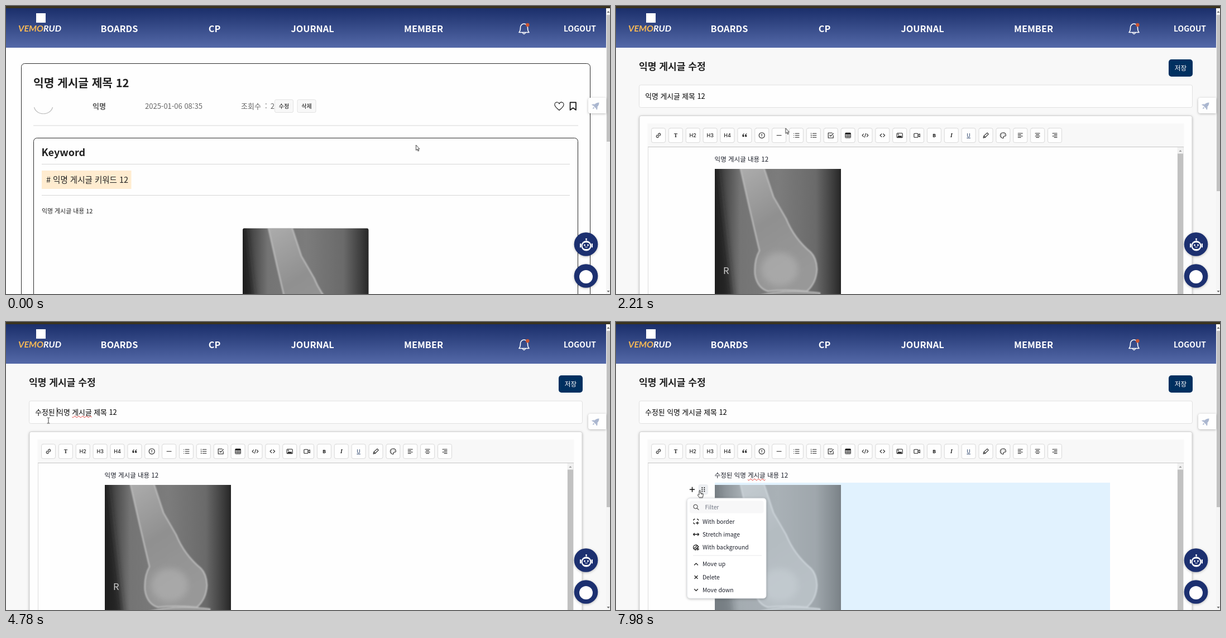
Write an HTML page that moves like this. It is 1082x518 px and loops after 8 s.

```html
<!DOCTYPE html>
<html lang="ko">
<head>
<meta charset="utf-8">
<title>익명 게시글 수정</title>
<style>
html, body { margin: 0; width: 100%; height: 100%; overflow: hidden; background: #fefefe; }
body, text { font-family: "Noto Sans CJK KR", "Noto Sans KR", "Noto Sans CJK JP", "Noto Sans", sans-serif; }
svg { position: absolute; left: 0; top: 0; width: 1082px; height: 518px; overflow: hidden; }
.b { font-weight: 700; }
.m { font-weight: 500; }
.c { text-anchor: middle; }
.line { position: absolute; line-height: 20px; white-space: pre; color: #000; }
#title { left: 52.3px; top: 151.6px; font-size: 12.8px; }
#content { left: 176.6px; top: 264.5px; font-size: 11.5px; color: #1d202b; }
.typed::before, .typed::after { content: ""; }
.typed::after { text-decoration: underline 1px; text-underline-offset: 3px; }
.caret { display: inline-block; width: 1px; height: 1.3em; margin-right: -1px; background: #000; vertical-align: -.28em; }
.spell { text-decoration: underline wavy 1px transparent; text-underline-offset: 1px; text-decoration-skip-ink: none; }
.lift { filter: drop-shadow(0 1px 2px #0004); }
.ico { fill: none; stroke: #222; stroke-width: 1.1; stroke-linecap: round; stroke-linejoin: round; }
.ico .f { fill: #222; stroke: none; }
</style>
</head>
<body>
<svg viewBox="0 0 1082 518">
  <defs>
    <linearGradient id="navy" x2="0" y2="1">
      <stop stop-color="#1b2f6b"/><stop offset="1" stop-color="#5469a8"/>
    </linearGradient>
    <linearGradient id="film">
      <stop stop-color="#2a2a2a"/><stop offset=".07" stop-color="#454545"/>
      <stop offset=".2" stop-color="#747474"/><stop offset=".5" stop-color="#7c7c7c"/>
      <stop offset=".8" stop-color="#6a6a6a"/><stop offset=".94" stop-color="#3c3c3c"/>
      <stop offset="1" stop-color="#262626"/>
    </linearGradient>
    <linearGradient id="bone" x2=".4" y2="1">
      <stop stop-color="#adadad"/><stop offset=".5" stop-color="#909090"/><stop offset="1" stop-color="#989898"/>
    </linearGradient>
    <filter id="soft"><feGaussianBlur stdDeviation="1.3"/></filter>
    <filter id="softer" x="-1" y="-1" width="3" height="3"><feGaussianBlur stdDeviation="6"/></filter>
    <clipPath id="edge"><rect width="226" height="240"/></clipPath>
    <clipPath id="round"><rect x="424" y="399.5" width="225.5" height="140" rx="4"/></clipPath>
    <g id="photo" clip-path="url(#edge)">
      <rect width="226" height="240" fill="url(#film)"/>
      <path d="M-20 -20H2L34 250H-20Z" fill="#1c1c1c" opacity=".8" filter="url(#softer)"/>
      <g filter="url(#soft)">
        <path d="M70 230Q120 215 188 223V250H70Z" fill="#989898" stroke="#bbb" stroke-width="2"/>
        <path d="M45 -5L62 70 80 147Q70 165 72 190 76 214 95 220 125 216 165 220 182 205 183 180 182 160 172 150 142 125 128 90L105 50 87 -5Z" fill="url(#bone)" stroke="#b9b9b9" stroke-width="2.5"/>
      </g>
      <ellipse cx="116" cy="180" rx="33" ry="30" fill="#b4b4b4" opacity=".6" filter="url(#softer)"/>
      <text x="15" y="189" font-size="16.5" fill="#cfcfcf">R</text>
    </g>
  </defs>

  <g id="post">
    <rect width="1082" height="518" fill="#fefefe"/>
    <g fill="none" stroke="#2b2b2b">
      <rect x="27.5" y="103.5" width="1019" height="440" rx="6"/>
      <rect x="49.5" y="237.5" width="975" height="300" rx="6"/>
    </g>
    <path d="M49 215H1025M64 284.5H1010M64 340.5H1010" stroke="#d6d6d6"/>
    <path d="M50.5 182A16.8 14.5 0 0 0 83.5 182" fill="none" stroke="#bdbdbd" stroke-width="1.2"/>
    <text class="b" x="49" y="145.8" font-size="20.3" fill="#212121">익명 게시글 제목 12</text>
    <g font-size="13" fill="#666">
      <text class="b" x="155" y="184.8" fill="#555">익명</text>
      <text x="249" y="184.8">2025-01-06 08:35</text>
      <text x="421" y="184.8">조회수</text><text x="464" y="184.8">:</text><text x="473.7" y="184.8">2</text>
    </g>
    <g fill="#f8f8f8" stroke="#e2e2e2">
      <rect x="481.5" y="168.5" width="33" height="23" rx="2.5"/>
      <rect x="522" y="168.5" width="33" height="23" rx="2.5"/>
      <rect id="hover" x="481.5" y="168.5" width="33" height="23" rx="2.5" fill="#dfdfdf" stroke="#dadada"/>
    </g>
    <g class="c" font-size="10">
      <text x="498" y="183.7">수정</text><text x="538.5" y="183.7">삭제</text>
    </g>
    <path d="M991 187.5C986 183.5 983 181 983 177.8A4 4 0 0 1 991 176.3 4 4 0 0 1 999 177.8C999 181 996 183.5 991 187.5Z" fill="none" stroke="#222" stroke-width="1.2"/>
    <path d="M1010.6 173.3H1021V187L1015.8 183.3 1010.6 187Z" fill="none" stroke="#111" stroke-width="1.7" stroke-linejoin="round"/>
    <text class="b" x="63.5" y="269.7" font-size="18" fill="#212121">Keyword</text>
    <rect x="64" y="296" width="160.5" height="33" fill="#ffecd0"/>
    <text x="72" y="317.9" font-size="14.5" fill="#222">#&#160;익명 게시글 키워드 12</text>
    <text x="64" y="373" font-size="10.9" fill="#222">익명 게시글 내용 12</text>
    <g clip-path="url(#round)"><use href="#photo" x="424" y="399.5"/></g>
  </g>

  <g id="edit">
    <rect width="1082" height="518" fill="#f8f8f8"/>
    <text class="b" x="41" y="115" font-size="17.1" fill="#212121">익명 게시글 수정</text>
    <rect x="990" y="96" width="43" height="31" rx="5" fill="#003060"/>
    <text class="c" x="1011.5" y="116.3" font-size="11.6" fill="#fff">저장</text>
    <rect x="41.5" y="142" width="991" height="40.5" rx="3" fill="#fefefe" stroke="#e0e0e0"/>
    <text id="hint" x="52.3" y="166.9" font-size="12.8" fill="#757575">제목을 입력하세요.</text>
    <rect class="lift" x="42" y="197.5" width="990" height="340" rx="3" fill="#fefefe" stroke="#d4d4d4"/>
    <rect x="56.5" y="211.5" width="961" height="42" fill="#f8f8f8"/>
    <path d="M57.5 518V253.5H1016.5V518" fill="none" stroke="#dcdcdc"/>
    <path d="M57 253.5H1017" stroke="#c4c4c4"/>
    <g id="bar"></g>
    <g id="body">
      <rect id="picked" x="177" y="289" width="708" height="230" fill="#e1f2fe"/>
      <use id="scan" href="#photo" x="177" y="293"/>
      <rect x="1005.5" y="254" width="11" height="264" fill="#f1f1f1"/>
      <rect x="1006" y="265.5" width="10" height="253" fill="#c1c1c1"/>
      <path d="M1008.5 262L1011 259 1013.5 262Z" fill="#999"/>
    </g>
  </g>

  <rect width="1075" height="71" y="4" fill="url(#navy)"/>
  <rect width="1082" height="4" fill="#3a3420"/>
  <rect x="54" y="13" width="17" height="17" fill="#fff"/>
  <text class="c" x="60.5" y="46" style="font:italic 700 16px Lato,sans-serif" fill="#f7b955">VEMO<tspan fill="#fff">RUD</tspan></text>
  <g class="b c" font-size="16.3" fill="#fff">
    <text x="203" y="46.5">BOARDS</text><text x="373.5" y="46.5">CP</text>
    <text x="549" y="46.5">JOURNAL</text><text x="748" y="46.5">MEMBER</text>
    <text x="1028" y="45.7" font-size="13.9">LOGOUT</text>
  </g>
  <path d="M919 47.5Q921.5 45 921.5 39A6.5 7 0 0 1 934.5 39Q934.5 45 937 47.5ZM925.5 48Q928 53 930.5 48" fill="none" stroke="#fff" stroke-width="1.6" stroke-linejoin="round"/>
  <circle cx="934.3" cy="34" r="3.2" fill="#cf5530"/>

  <rect x="1075" y="4" width="7" height="514" fill="#f5f5f5"/>
  <rect x="1076" y="16" width="6" height="228" fill="#c1c1c1"/>
  <rect id="thumb" x="1076" y="16" width="6" height="317" fill="#c1c1c1"/>
  <path d="M1076.5 12L1079 9 1081.5 12ZM1076.5 512L1079 515 1081.5 512Z" fill="#666"/>

  <path class="lift" d="M1075 165H1047Q1043 165 1043 169V189Q1043 193 1047 193H1075Z" fill="#fefefe"/>
  <path transform="translate(1056.5 179.5) rotate(45)" d="M0-8.5Q4.5-4 3 3H-3Q-4.5-4 0-8.5ZM-4-1L-7 4-3 3ZM4-1L7 4 3 3ZM-1.5 4.5H1.5L0 8Z" fill="#aab6cf"/>

  <g class="lift" fill="#1c3070">
    <circle cx="1039" cy="428.5" r="21.3"/><circle cx="1039" cy="485.5" r="21.3"/>
  </g>
  <g fill="#fff">
    <circle cx="1039" cy="487" r="12"/>
    <circle cx="1039.5" cy="419.3" r="1.5"/>
    <path d="M1039 419H1040V424H1039Z"/>
    <rect x="1028" y="427" width="2.3" height="7.5" rx="1.1"/><rect x="1048.7" y="427" width="2.3" height="7.5" rx="1.1"/>
    <ellipse cx="1039.5" cy="431.3" rx="9" ry="9.3"/>
  </g>
  <rect x="1032.7" y="425.5" width="13.6" height="11.5" rx="5.5" fill="#1c3070"/>
  <path d="M1037 432.8Q1039.5 435.5 1042 432.8" fill="none" stroke="#fff"/>
  <circle cx="1036.5" cy="430" r="1.5" fill="#fff"/><circle cx="1042.5" cy="430" r="1.5" fill="#fff"/>
</svg>

<div class="line" id="title"><span class="typed" id="word1"></span><span class="caret" id="caret1"></span>익명 <span class="spell" id="spell1">게시글</span> 제목 12</div>
<div class="line" id="content"><span class="typed" id="word2"></span><span class="caret" id="caret2"></span>익명 <span class="spell" id="spell2">게시글</span> 내용 12</div>

<svg viewBox="0 0 1082 518">
  <g id="tools">
    <rect id="grip" x="147.5" y="265" width="17.5" height="18.5" rx="4" fill="#eceef1"/>
    <path d="M132.5 274.3H140.5M136.5 270.3V278.3" stroke="#111" stroke-width="1.5" stroke-linecap="round"/>
    <path d="M154.3 271V278M158.3 271V278" stroke="#111" stroke-width="2" stroke-linecap="round" stroke-dasharray="0 3.3"/>
  </g>

  <g id="menu">
    <rect class="lift" x="127.5" y="317" width="141.5" height="180" rx="5" fill="#fff" stroke="#e6e8ec"/>
    <rect x="132" y="321.5" width="132.5" height="22.5" rx="4" fill="#f7f7f8"/>
    <path d="M138 420H261" stroke="#e8e8eb"/>
    <g class="ico" style="stroke-width:1.3">
      <path stroke="#666" d="M145.3 334.3A3.6 3.6 0 1 0 144.8 334.8L148 337.5"/>
      <path d="M141 354.5Q139 354.5 139 356.5M139 361Q139 363 141 363M145.5 354.5Q147.5 354.5 147.5 356.5M143.5 361.5H148M145.8 359.3V363.7"/>
      <path d="M138.5 382H148.5M140.5 380L138.5 382 140.5 384M146.5 380L148.5 382 146.5 384"/>
      <path d="M147.5 405A4.5 4.5 0 1 0 143.5 410M139.5 407.5L146 402M141 409.5L148 404M144.5 408.5H148.5M146.5 406.5V410.5"/>
      <path d="M140.5 437L143.5 434 146.5 437M141 456.5L146 461.5M146 456.5L141 461.5M140.5 480.5L143.5 483.5 146.5 480.5"/>
    </g>
    <g class="m" font-size="10.3" fill="#1d202b">
      <text x="159.5" y="336.5" fill="#707684" font-weight="400">Filter</text>
      <text x="155" y="362.8">With border</text>
      <text x="155" y="385.9">Stretch image</text>
      <text x="155" y="409.2">With background</text>
      <text x="155" y="439.3">Move up</text>
      <text x="155" y="462.6">Delete</text>
      <text x="155" y="485.8">Move down</text>
    </g>
  </g>

  <g id="dialog">
    <rect class="lift" x="383" y="-10" width="319" height="110" rx="7" fill="#1e1c15" stroke="#4a473d"/>
    <text x="398.5" y="23.1" font-size="11.2" fill="#e8e4d8">vemorud.info 내용:</text>
    <text x="398.5" y="43.7" font-size="10.1" fill="#e0dccf">수정 페이지로 이동하시겠습니까?</text>
    <rect id="ring" x="589" y="56" width="49.5" height="31.5" rx="15.7" fill="none" stroke="#efe7ac" stroke-width="1.7"/>
    <rect x="591" y="58.5" width="45.5" height="27" rx="13.5" fill="#d9ca73"/>
    <rect x="642.5" y="58.5" width="45" height="26.5" rx="13.2" fill="none" stroke="#67624f"/>
    <g class="c" font-size="9.9">
      <text x="613.7" y="75.6" fill="#463b05">확인</text><text x="665" y="75.6" fill="#d3c57c">취소</text>
    </g>
  </g>

  <g id="cursor" stroke="#222" stroke-width=".9" stroke-linejoin="round" fill="#fff">
    <path id="arrow" d="M0 0V9.5L2.2 7.6 3.7 11 5.2 10.3 3.7 7.1H6.3Z"/>
    <path id="hand" d="M-1 1Q0-1 1 1V5L5.5 6Q6.5 6.5 6.3 8L5.3 13H-1L-4 8.5Q-3.5 6.5-1 8.5ZM2.7 5.5V7.5M4.3 6V7.8"/>
    <path id="beam" fill="none" d="M-2.3-5H-.5L0-4.5 .5-5H2.3M-2.3 5H-.5L0 4.5 .5 5H2.3M0-4.5V4.5"/>
  </g>
</svg>

<script>
const LOOP = 8000;
const rules = [];

// steps: {ms: declarations}
function play(target, ease, steps) {
  const name = target.replace(/\W/g, '');
  const keys = Object.entries(steps).map(([ms, css]) => `${ms * 100 / LOOP}%{${css}}`);
  rules.push(`@keyframes ${name}{${keys.join('')}} ${target}{animation:${name} ${LOOP}ms ${ease} infinite}`);
}

// Visible in each [from, to) span
function show(id, ...spans) {
  const steps = { 0: 'opacity:0' };
  for (const [from, to] of spans) {
    steps[from] = 'opacity:1';
    if (to < LOOP) steps[to] = 'opacity:0';
  }
  play('#' + id, 'step-end', steps);
}

// Committed text and the syllable still being composed
const syllables = [['', 'ㅅ'], ['', '수'], ['', '숮'], ['수', '저'], ['수', '정'],
  ['수정', 'ㄷ'], ['수정', '도'], ['수정', '되'], ['수정', '된'], ['수정된 ', '']];

function type(id, from, to) {
  ['before', 'after'].forEach((part, k) => {
    const steps = { 0: 'content:""' };
    syllables.forEach((s, i) => {
      steps[Math.floor(from + (to - from) * i / (syllables.length - 1))] = `content:"${s[k]}"`;
    });
    play(`#${id}::${part}`, 'step-end', steps);
  });
}

const spell = (id, from, to) => play('#' + id, 'step-end', {
  0: 'text-decoration-color:transparent',
  [from]: 'text-decoration-color:#e0322c',
  [to]: 'text-decoration-color:transparent'
});
const at = (x, y) => `transform:translate(${x}px,${y}px)`;

// Toolbar
const word = (s, style) => `<text class="c" y="3.3" fill="#222" stroke="none" style="${style}">${s}</text>`;
const heading = s => word(s, 'font:500 9px Inter,sans-serif');
const path = (d, cls = '') => `<path class="${cls}" d="${d}"/>`;
const rows = (...x) => path(x.map(([a, b], i) => `M${a} ${i * 2.5 - 3.7}H${b}`).join(''));
const icons = [
  `<g transform="rotate(-45)">${path('M-1-2H-2.5A2 2 0 0 0-2.5 2H-1M1-2H2.5A2 2 0 0 1 2.5 2H1M-1.5 0H1.5')}</g>`,
  word('T', "font:700 9px 'Noto Serif',serif"),
  heading('H2'), heading('H3'), heading('H4'),
  path('M-.7-3.5Q-4-3-4 1A1.7 1.7 0 1 0-2.5-.7Q-2.3-2-.7-2.5ZM4-3.5Q.7-3 .7 1A1.7 1.7 0 1 0 2.2-.7Q2.4-2 4-2.5Z', 'f'),
  '<circle r="5"/>' + path('M0-2.5V.5M0 2.3V2.4'),
  path('M-4 0H4'),
  path('M-1.8-3.5H5M-1.8 0H5M-1.8 3.5H5M-4.5-3.5H-4.4M-4.5 0H-4.4M-4.5 3.5H-4.4'),
  path('M-1.5-3.5H5M-1.5 0H5M-1.5 3.5H5') + path('M-4.5-4.8H-3.8V-2.2H-4.5ZM-4.8-.9H-3.5V.9H-4.8ZM-4.8 2.6H-3.5V4.4H-4.8Z', 'f'),
  path('M4.5 0V4.5H-4.5V-4.5H2.5M-2-.5L0 1.5 4.7-3.5'),
  '<rect x="-4.7" y="-4.3" width="9.4" height="8.6" rx="1"/>' + path('M-4.7-4.3H4.7V-1.7H-4.7Z', 'f') + path('M-4.7 1.3H4.7M-1.5-2V4M1.7-2V4'),
  path('M-3-2.5L-5.3 0-3 2.5M3-2.5L5.3 0 3 2.5M1-3.5L-1 3.5'),
  path('M-1.5-2.7L-4.3 0-1.5 2.7M1.5-2.7L4.3 0 1.5 2.7'),
  '<rect x="-5" y="-4" width="10" height="8" rx="1"/>' + path('M-4.5 3.5L-1.5-.5 .5 1.5 2.3 0 4.5 3.5Z', 'f') + '<circle class="f" cx="-2.5" cy="-2" r="1"/>',
  '<rect x="-5.2" y="-3.5" width="7.2" height="7" rx="1"/>' + path('M2-.8L5.2-2.7V2.7L2 .8'),
  word('B', "font:700 9px 'Noto Sans',sans-serif"),
  word('I', "font:italic 600 9px 'Noto Serif',serif"),
  word('U', "font:500 9px 'Noto Sans',sans-serif;text-decoration:underline;fill:#1b3560"),
  path('M-4.5 4.5L-3.5 1 2.5-4.5 4.7-2.3-1 3.5ZM-3.3 1.3L-1 3.5'),
  path('M0-5A5 5 0 1 0 0 5Q1.5 4.5 .7 2.7 1 1 3 1.3 5 1.5 5-.5 4.5-5 0-5ZM-2.7 1V1.1M-2.5-1.7V-1.6M0-3V-2.9M2.5-1.7V-1.6'),
  rows([-4, 4], [-4, 1], [-4, 4], [-4, 1]),
  rows([-4, 4], [-2.5, 2.5], [-4, 4], [-2.5, 2.5]),
  rows([-4, 4], [-1, 4], [-4, 4], [-1, 4])
];
document.getElementById('bar').innerHTML = icons.map((icon, i) =>
  `<g class="ico" transform="translate(${76 + i * 30.87} 232.7)">
    <rect x="-12.5" y="-13" width="25" height="26" rx="3" style="fill:#fefefe;stroke:#d9d9d9;stroke-width:1"/>${icon}</g>`).join('');

// Pages
show('post', [0, 1940]);
show('edit', [1940, LOOP]);
show('thumb', [1940, LOOP]);
show('hover', [580, 1940]);
show('hint', [1940, 2200]);
['body', 'title', 'content'].forEach(id => show(id, [2200, LOOP]));
play('#dialog', 'linear', {
  0: 'opacity:0', 1049: 'opacity:0', 1050: 'opacity:.35', 1190: 'opacity:.87',
  1270: 'opacity:1', 2060: 'opacity:1', 2140: 'opacity:0', 8000: 'opacity:0'
});
show('ring', [1050, 1940]);

// Typing
type('word1', 3640, 4250);
type('word2', 6070, 6750);
show('caret1', [3240, 5400]);
show('caret2', [6000, 7280]);
spell('spell1', 3640, 5400);
spell('spell2', 5540, 7999);

// Block controls
const row = n => `opacity:1;transform:translateY(${n * 27}px)`;
play('#tools', 'step-end', { 0: 'opacity:0', 5180: row(1), 5330: row(0), 6070: 'opacity:0', 7280: row(0), 7420: row(1) });
show('grip', [7680, LOOP]);
show('picked', [7770, LOOP]);
play('#scan', 'step-end', { 0: 'opacity:1', 7770: 'opacity:.55' });
play('#menu', 'linear', {
  0: 'opacity:0', 7770: 'opacity:0;transform:translateY(-6px)',
  7850: 'opacity:1;transform:none', 8000: 'opacity:1;transform:none'
});

// Pointer
play('#cursor', 'ease-in-out', {
  0: at(734.5, 250), 200: at(734.5, 250), 600: at(480, 183), 720: at(505, 189),
  1230: at(505, 189), 1430: at(536, 281), 1520: at(537, 263), 2040: at(537, 263),
  2340: at(160.5, 193), 2400: at(160.5, 193), 2690: at(110, 165), 2740: at(110, 165),
  3080: at(45, 166), 3310: at(55, 163), 4660: at(64, 166), 5250: at(203, 296),
  5470: at(179, 277), 7250: at(179, 277), 7460: at(186, 298), 7740: at(150, 302.5), 8000: at(150, 302.5)
});
show('arrow', [0, 580], [1260, 1940], [2100, 2600], [4850, 5230], [7400, 7680]);
show('hand', [580, 1260], [7680, LOOP]);
show('beam', [1940, 2100], [2600, 3640], [4710, 4850], [5230, 6070], [7280, 7400]);

const sheet = document.createElement('style');
sheet.textContent = rules.join('\n');
document.head.append(sheet);
</script>
</body>
</html>
```
